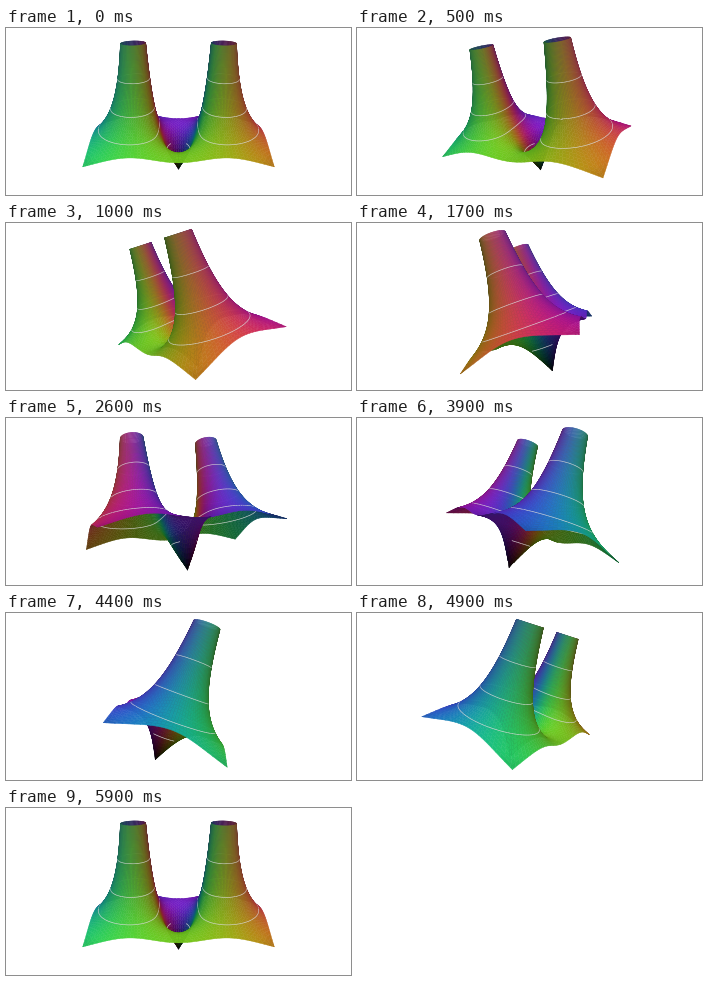
These frames come from a looping animation (345x167 px, 6 s). A matplotlib script:

```python
import numpy as np
import matplotlib.pyplot as plt
from matplotlib.animation import FuncAnimation
from matplotlib.collections import PolyCollection

W, H, DPI = 345, 167, 100
FRAMES, INTERVAL = 60, 100

UNIT = 40                      # pixels per unit of the complex plane
HALF_W, HALF_D = 2.16, 1.21    # half extents of the domain
TOP = 1.74                     # modulus at which the poles are cut off
GAIN, DROP = 78, 67.8          # height = GAIN * |f| - DROP
TILT = np.radians(20.2)        # lean of the surface against the spin axis
ELEV = np.radians(2.7)
DIST = 320
LEVELS = [1.31 * 2 ** (-k / 2) for k in (0, 1, 2, 4)]
LIGHT = np.array([0.0, -0.72, 0.69])


def f(z):
    return z / (z * z - 1)


def surface(z):
    """Place points of the complex plane on the tilted modulus surface."""
    u, v = UNIT * z.real, UNIT * z.imag
    w = GAIN * np.abs(f(z)) - DROP
    y = v * np.cos(TILT) - w * np.sin(TILT)
    h = v * np.sin(TILT) + w * np.cos(TILT)
    return np.stack([u, y, h], axis=-1)


def polar_grid():
    """Rays from the rim of the right pole to the border of its half domain."""
    corners = [complex(x, y) for x in (-1, HALF_W - 1) for y in (-HALF_D, HALF_D)]
    phi = np.linspace(0, 2 * np.pi, 97)
    phi = np.sort(np.append(phi, np.angle(corners) % (2 * np.pi)))
    ray = np.exp(1j * phi)
    inner = np.full(phi.size, 0.28)
    for _ in range(30):
        inner *= np.abs(f(1 + inner * ray)) / TOP
    side = np.where(ray.real > 0, HALF_W - 1, 1)
    outer = np.minimum(side / np.maximum(np.abs(ray.real), 1e-9),
                       HALF_D / np.maximum(np.abs(ray.imag), 1e-9))
    t = np.linspace(0, 1, 27)
    return 1 + ray[:, None] * inner[:, None] * (outer / inner)[:, None] ** t


def contour(grid, level):
    """Segments joining the crossings of one level on neighbouring rays."""
    m = np.minimum.accumulate(np.abs(f(grid)), axis=1)
    hit = np.full(len(grid), np.nan, dtype=complex)
    for i, row in enumerate(m):
        j = int(np.argmax(row <= level))
        if j:
            s = (row[j - 1] - level) / (row[j - 1] - row[j])
            hit[i] = grid[i, j - 1] + s * (grid[i, j] - grid[i, j - 1])
    a, b = hit[:-1], hit[1:]
    ok = ~np.isnan(a) & ~np.isnan(b)
    return np.stack([a, b, b, a], axis=-1)[ok]


def phase_colour(value):
    """Cosine colour wheel, paler towards the poles and black at the zero."""
    size = np.abs(value)[:, None]
    offset = np.radians([0, 120, 240])
    swing = 0.44 - 0.11 * np.clip(size, 0, TOP)
    rgb = 0.46 + swing * np.cos(np.angle(value)[:, None] - offset)
    return rgb * np.clip(size / 0.5, 0, 1) ** 0.8


grid = polar_grid()
cells = np.stack([grid[:-1, :-1], grid[:-1, 1:], grid[1:, 1:], grid[1:, :-1]],
                 axis=-1).reshape(-1, 4)
lines = np.concatenate([contour(grid, lv) for lv in LEVELS])
cells = np.concatenate([cells, -cells])
lines = np.concatenate([lines, -lines])
n_cells = len(cells)
points = surface(np.concatenate([cells, lines]))
base = phase_colour(f(cells.mean(axis=1)))

colours = np.full((len(points), 3), 0.85)
widths = np.where(np.arange(len(points)) < n_cells, 0.3, 0.45)


def to_camera(p, angle):
    c, s = np.cos(angle), np.sin(angle)
    x, y, h = p[..., 0], p[..., 1], p[..., 2]
    x, y = x * c + y * s, y * c - x * s
    depth = y * np.cos(ELEV) - h * np.sin(ELEV)
    up = y * np.sin(ELEV) + h * np.cos(ELEV)
    return np.stack([x, depth, up], axis=-1)


def shade(q):
    normal = np.cross(q[:, 2] - q[:, 0], q[:, 3] - q[:, 1])
    normal /= np.linalg.norm(normal, axis=1, keepdims=True) + 1e-9
    view = np.array([0, -DIST, 0]) - q.mean(axis=1)
    front = np.sum(normal * view, axis=1) > 0
    lit = np.clip(normal @ LIGHT, 0, 1)
    under = 0.5 + 0.15 * np.clip(-normal[:, 1], 0, 1)
    return np.where(front, 0.5 + 0.5 * lit, under)


fig = plt.figure(figsize=(W / DPI, H / DPI), dpi=DPI, facecolor="white")
ax = fig.add_axes([0, 0, 1, 1])
ax.set_xlim(0, W)
ax.set_ylim(H, 0)
ax.axis("off")
mesh = PolyCollection([], closed=True)
ax.add_collection(mesh, autolim=False)


def draw(i):
    q = to_camera(points, 2 * np.pi * i / (FRAMES - 1))
    colours[:n_cells] = base * shade(q[:n_cells])[:, None]
    far = np.linalg.norm(q + np.array([0, DIST, 0]), axis=-1).mean(axis=1)
    far[n_cells:] -= 3
    order = np.argsort(-far)
    scale = DIST / (DIST + q[..., 1])
    flat = np.stack([W / 2 + scale * q[..., 0], H / 2 - scale * q[..., 2]], axis=-1)
    mesh.set_verts(flat[order])
    mesh.set_facecolor(colours[order])
    mesh.set_edgecolor(colours[order])
    mesh.set_linewidth(widths[order])
    return [mesh]


anim = FuncAnimation(fig, draw, frames=FRAMES, interval=INTERVAL,
                     init_func=lambda: [mesh], repeat=True, repeat_delay=0)
plt.show()
```
